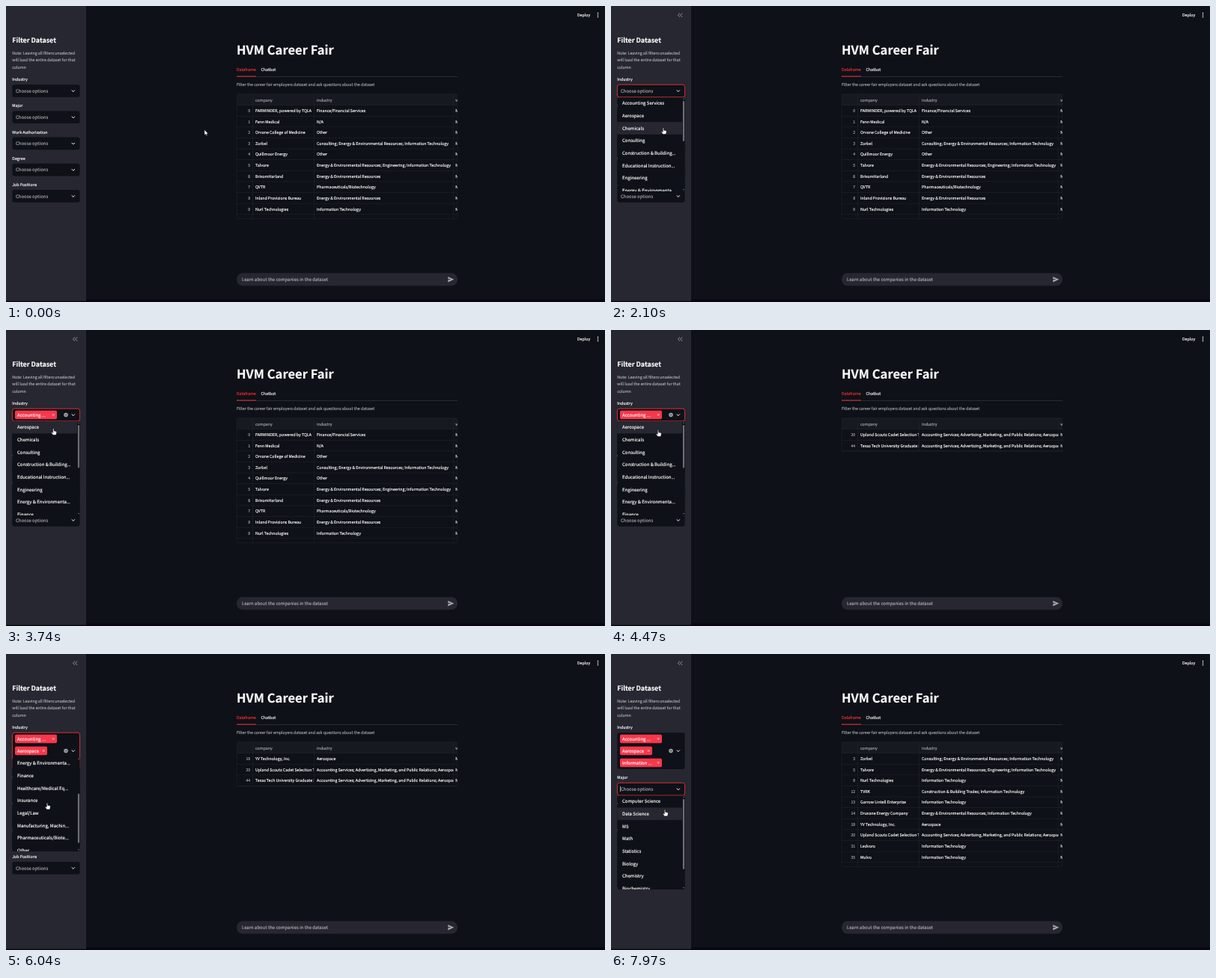
Animation, 800 px wide and 396 px high, one loop 8 s. Source, as an HTML page:

```html
<!DOCTYPE html>
<html lang="en">
<head>
<meta charset="utf-8">
<title>Career fair dashboard</title>
<style>
  html, body { margin: 0; width: 100%; height: 100%; overflow: hidden; background: #0e1117; }
  svg { display: block; width: 800px; height: 396px; }
  text {
    font-family: "Noto Sans CJK JP", "Noto Sans CJK SC", "Noto Sans CJK", "Open Sans", sans-serif;
    text-rendering: geometricPrecision;
    stroke-width: 0.16px;
  }
</style>
</head>
<body>
<svg id="stage" viewBox="0 0 800 396"></svg>
<script>
const LOOP = 8000, ITEM = 16.67, ROW = 14.62, LIST_H = 126;
const WHITE = '#fafafa', GREY = '#a3a4a9', DARK = '#0e1117', PANEL = '#262730';
const RED = '#f7374b', ACCENT = '#ee2f35', LINE = '#23262e';

const industries = ['Accounting Services', 'Aerospace', 'Chemicals', 'Consulting',
  'Construction & Building...', 'Educational Instruction...', 'Engineering',
  'Energy & Environmenta...', 'Finance', 'Healthcare/Medical Eq...', 'Information Technology',
  'Insurance', 'Legal/Law', 'Manufacturing, Machin...', 'Pharmaceuticals/Biote...', 'Other'];
const majors = ['Computer Science', 'Data Science', 'MS', 'Math', 'Statistics', 'Biology',
  'Chemistry', 'Biochemistry', 'Physics'];
const picks = ['Accounting Services', 'Aerospace', 'Information Technology'];
const tags = [['Accounting ...', 56], ['Aerospace', 43], ['Information ...', 56]];
const labels = ['Industry', 'Major', 'Work Authorization', 'Degree', 'Job Positions'];

const IT = 'Information Technology', ENV = 'Energy & Environmental Resources';
const MANY = 'Accounting Services; Advertising, Marketing, and Public Relations; Aerospace; Chemicals';
const talvore = [5, 'Talvore', `${ENV}; Engineering; ${IT}`];
const zorbel = [3, 'Zorbel', `Consulting; ${ENV}; ${IT}`];
const nurl = [9, 'Nurl Technologies', IT];
const yv = [19, 'YV Technology, Inc.', 'Aerospace'];
const upland = [20, 'Upland Scouts Cadet Selection Team', MANY];
const grad = [44, 'Texas Tech University Graduate School', MANY];
const tables = [
  [[0, 'FARWINDER, powered by TQLA', 'Finance/Financial Services'],
   [1, 'Fenn Medical', 'N/A'],
   [2, 'Orvane College of Medicine', 'Other'],
   zorbel,
   [4, 'Quillmoor Energy', 'Other'],
   talvore,
   [6, 'BrixomHarland', ENV],
   [7, 'QVTR', 'Pharmaceuticals/Biotechnology'],
   [8, 'Inland Provisions Bureau', ENV],
   nurl],
  [upland, grad],
  [yv, upland, grad],
  [zorbel, talvore, nurl,
   [12, 'TVRK', `Construction & Building Trades; ${IT}`],
   [13, 'Garrow Lintell Enterprise', IT],
   [14, 'Druvane Energy Company', `${ENV}; ${IT}`],
   yv, upland,
   [31, 'Ledvoro', IT],
   [35, 'Mulvo', IT]]
];

// time, x, y of the pointer tip
const path = [[440, 265, 165.5], [980, 84, 117], [1340, 84, 117], [1700, 74, 141], [2250, 69, 168],
  [2800, 66, 182.5], [3000, 66, 182.5], [3500, 64, 132], [3900, 63, 132], [4300, 63, 134],
  [4720, 63, 134], [4920, 68, 204], [5250, 68, 204], [5650, 55, 199.5], [6250, 55, 199.5],
  [6600, 165, 192], [7050, 165, 192], [7450, 80, 179], [7600, 80, 179], [7850, 72, 208.5]];
const scrolls = [[4890, 0], [5060, 4 * ITEM], [5190, 4 * ITEM], [5320, 5 * ITEM]];
const pickTimes = [3700, 4700, 5850], tableTimes = [4000, 4950, 6150];
const OPEN = 1130, CLOSE = 6650, REOPEN = 7550;

function el(parent, tag, attrs) {
  const e = document.createElementNS('http://www.w3.org/2000/svg', tag);
  for (const k in attrs) e.setAttribute(k, attrs[k]);
  parent.appendChild(e);
  return e;
}
const rect = (p, x, y, width, height, fill, more) => el(p, 'rect', { x, y, width, height, fill, ...more });
const line = (p, d, stroke, width, more) =>
  el(p, 'path', { d, stroke, fill: 'none', 'stroke-width': width, ...more });
// y is the middle of the capitals; the face draws its Latin larger than nominal
function text(p, x, y, str, size = 5.83, fill = WHITE, more) {
  const e = el(p, 'text', { x, y: y + size * 0.34, fill, stroke: fill, 'font-size': size / 1.105, ...more });
  e.textContent = str;
  return e;
}
const show = (e, on) => e.setAttribute('visibility', on ? 'visible' : 'hidden');
const count = (times, t) => times.filter(at => t >= at).length;

function ease(keys, t) {
  if (t <= keys[0][0]) return keys[0].slice(1);
  for (let i = 1; i < keys.length; i++) {
    const [a, ...from] = keys[i - 1], [b, ...to] = keys[i];
    if (t < b) {
      const u = (t - a) / (b - a), s = u * u * (3 - 2 * u);
      return from.map((v, j) => v + (to[j] - v) * s);
    }
  }
  return keys[keys.length - 1].slice(1);
}

const stage = document.getElementById('stage');
const defs = el(stage, 'defs', {});
function clip(id, x, y, w, h) {
  const c = el(defs, 'clipPath', { id });
  return rect(c, x, y, w, h, '#fff');
}
clip('company', 330, 117, 81, 168);
clip('industry', 412, 117, 185.5, 168);
clip('extra', 598, 117, 5, 168);
const listClip = clip('list', 8, 122, 91, LIST_H);

// page
rect(stage, 0, 0, 800, 396, DARK);
rect(stage, 0, 0, 107, 396, PANEL);
text(stage, 763, 12, 'Deploy');
for (const y of [9.6, 12.1, 14.6]) el(stage, 'circle', { cx: 790.5, cy: y, r: 0.8, fill: WHITE });
text(stage, 308, 59, 'HVM Career Fair', 18.33, WHITE, { 'font-weight': 700 });
rect(stage, 308, 94, 295, 0.6, '#3a3c43');
rect(stage, 308, 93.6, 26, 1, ACCENT);
text(stage, 308, 85.3, 'Dataframe', 5.83, ACCENT);
text(stage, 340.5, 85.3, 'Chatbot');
text(stage, 308, 105.5, 'Filter the career fair employers dataset and ask questions about the dataset', 5.83, GREY);
rect(stage, 308, 357.3, 295, 17, PANEL, { rx: 8 });
text(stage, 315, 365.6, 'Learn about the companies in the dataset', 6.6, '#a9aaae');
el(stage, 'path', { d: 'M590.3 362.2 L598.4 365.8 L590.3 369.4 V366.6 L595 365.8 L590.3 365 Z', fill: '#a9aaae' });

// sidebar
const collapse = line(stage, 'M92 9.6 L89.4 12.2 L92 14.8 M95.2 9.6 L92.6 12.2 L95.2 14.8', '#b4b5b9', 0.8);
text(stage, 8.3, 45.6, 'Filter Dataset', 9.8, WHITE, { 'font-weight': 700 });
['Note: Leaving all filters unselected', 'will load the entire dataset for that', 'column']
  .forEach((s, i) => text(stage, 8.3, 63 + i * 9.35, s, 5.83, '#a9aaae'));

const table = el(stage, 'g', {});
const fields = el(stage, 'g', {});
const caret = rect(stage, 12.2, 109.8, 0.6, 7.4, WHITE);
const list = el(stage, 'g', {});
rect(stage, 107, 392.6, 693, 3.4, '#0b0512');
rect(stage, 0, 394.6, 107, 1.4, '#0b0512');

const pointers = {
  arrow: el(stage, 'path', { d: 'M0 0 V7.3 L1.7 5.8 L2.8 8.3 L4 7.8 L2.9 5.4 H5.2 Z',
    fill: '#fff', stroke: '#000', 'stroke-width': 0.5 }),
  beam: line(stage, 'M-1.3 -3.6 H1.3 M0 -3.6 V3.6 M-1.3 3.6 H1.3', '#e8e8e8', 0.7),
  hand: el(stage, 'path', {
    d: 'M-.7 .2 Q0 -.6 .7 .2 V3 L3.6 3.5 Q4.4 3.8 4.3 4.8 L3.6 8.4 H-.6 L-2.7 5.4 Q-2.6 4.4 -1.6 4.7 L-.7 5.6 Z',
    fill: '#fff', stroke: '#000', 'stroke-width': 0.5 })
};

function drawTable(rows) {
  table.replaceChildren();
  const h = rows.length < 10 ? (rows.length + 1) * ROW + 0.4 : 166.7, end = 118 + h;
  rect(table, 308.3, 118, 294.5, ROW, '#171921');
  for (let y = 118 + ROW; y < end; y += ROW) rect(table, 308.3, y - 0.25, 294.5, 0.5, LINE);
  for (const x of [329.6, 411.4, 597.8]) rect(table, x - 0.25, 118, 0.5, h, LINE);
  rect(table, 308.3, 118, 294.5, h, 'none', { stroke: LINE, 'stroke-width': 0.6, rx: 1.5 });
  const col = id => el(table, 'g', { 'clip-path': `url(#${id})` });
  const company = col('company'), industry = col('industry'), extra = col('extra');
  text(company, 333, 125.6, 'company', 5.83, GREY);
  text(industry, 415, 125.6, 'industry', 5.83, GREY);
  text(extra, 600.3, 125.6, 'work', 5.83, GREY);
  rows.forEach(([n, name, field], i) => {
    const y = 140 + i * ROW;
    text(table, 326.3, y, n, 5.83, GREY, { 'text-anchor': 'end' });
    text(company, 333, y, name);
    text(industry, 415, y, field);
    text(extra, 600.3, y, 'None');
  });
}

function drawFields(picked, focus) {
  fields.replaceChildren();
  const grow = Math.max(0, picked - 1) * 16;
  labels.forEach((label, i) => {
    const y = 98.2 + i * 35.2 + (i ? grow : 0), h = 16.7 + (i ? 0 : grow);
    const mid = y + 7 + h / 2;
    text(fields, 8.3, y, label);
    rect(fields, 8.4, y + 7, 90.2, h, DARK,
      { rx: 3, stroke: focus === i ? ACCENT : DARK, 'stroke-width': focus === i ? 0.9 : 0 });
    line(fields, `M87.7 ${mid - 1} L89.8 ${mid + 1.1} L91.9 ${mid - 1}`, WHITE, 1);
    if (i || !picked) {
      text(fields, 13, mid, 'Choose options', 6.6, GREY);
      return;
    }
    el(fields, 'circle', { cx: 80, cy: mid, r: 2.8, fill: '#a3a4a8' });
    line(fields, `M79 ${mid - 1} l2 2 m0 -2 l-2 2`, DARK, 0.6);
    tags.slice(0, picked).forEach(([name, w], n) => {
      const ty = 113.5 + n * 16, x = 12 + w - 6;
      rect(fields, 12, ty - 5.8, w, 11.6, RED, { rx: 1.8 });
      text(fields, 15, ty, name, 6.67);
      line(fields, `M${x} ${ty - 1.2} l2.4 2.4 m0 -2.4 l-2.4 2.4`, WHITE, 0.7);
    });
  });
}

let view = null;
function drawList(items, top) {
  list.replaceChildren();
  view = null;
  if (!items) return;
  listClip.setAttribute('y', top);
  rect(list, 8.3, top + 0.4, 90.4, LIST_H - 0.4, DARK, { rx: 3 });
  const body = el(list, 'g', { 'clip-path': 'url(#list)' });
  const mark = rect(body, 8.3, 0, 86.7, ITEM, PANEL);
  const rows = el(body, 'g', {});
  items.forEach((s, i) => text(rows, 15, top + 8.1 + i * ITEM, s, 6.67));
  const bar = el(list, 'g', {});
  const total = items.length * ITEM + 8;
  const thumb = rect(bar, 95.9, 0, 2.2, 118 * LIST_H / total, '#6d6e74', { rx: 1.1 });
  el(bar, 'path', { d: `M96 ${top + 3} h2 l-1 -1.5 z M96 ${top + LIST_H - 3} h2 l-1 1.5 z`, fill: '#7d7e84' });
  view = { top, mark, rows, bar, thumb, total };
}

function moveList(t, x, y, inside) {
  const scroll = t < CLOSE ? ease(scrolls, t)[0] : 0;
  let index = inside ? Math.floor((y - view.top + scroll) / ITEM) : 0;
  if (t >= 4890 && t < 5250) index = 4;
  view.rows.setAttribute('transform', `translate(0 ${-scroll})`);
  view.mark.setAttribute('y', view.top - 0.2 + index * ITEM - scroll);
  show(view.mark, !(t >= pickTimes[2] && t < CLOSE));
  view.thumb.setAttribute('y', view.top + 5 + 118 * scroll / view.total);
  show(view.bar, inside);
}

let oldTable = -1, oldState = '';
function render(t) {
  const picked = count(pickTimes, t), filled = count(tableTimes, t);
  const focus = t >= REOPEN ? 1 : t >= OPEN && t < CLOSE ? 0 : -1;
  if (filled !== oldTable) drawTable(tables[oldTable = filled]);
  const state = picked + '/' + focus;
  if (state !== oldState) {
    oldState = state;
    drawFields(picked, focus);
    if (focus === 1) drawList(majors, 189);
    else if (focus === 0) drawList(industries.filter(s => !picks.slice(0, picked).includes(s)), picked > 1 ? 138 : 122);
    else drawList(null);
  }

  const [x, y] = ease(path, t);
  const inside = !!view && x < 99 && y > view.top && y < view.top + LIST_H;
  if (view) moveList(t, x, y, inside);

  const since = t - (focus ? REOPEN : OPEN);
  caret.setAttribute('y', focus ? 176.8 : 109.8);
  show(caret, (focus === 1 || (focus === 0 && !picked)) && since % 1000 < 500);
  show(collapse, x < 107);

  const boxTop = t > CLOSE ? 172 : 105, inBox = x < 99 && y > boxTop && y < boxTop + 17;
  const scrolling = t >= 4850 && t < 5250;
  const kind = inside && !scrolling ? 'hand' : inBox ? 'beam' : 'arrow';
  for (const k in pointers) show(pointers[k], k === kind);
  pointers[kind].setAttribute('transform', `translate(${x} ${y})`);
}

const start = performance.now();
function tick() {
  render((performance.now() - start) % LOOP);
  requestAnimationFrame(tick);
}
tick();
</script>
</body>
</html>
```
